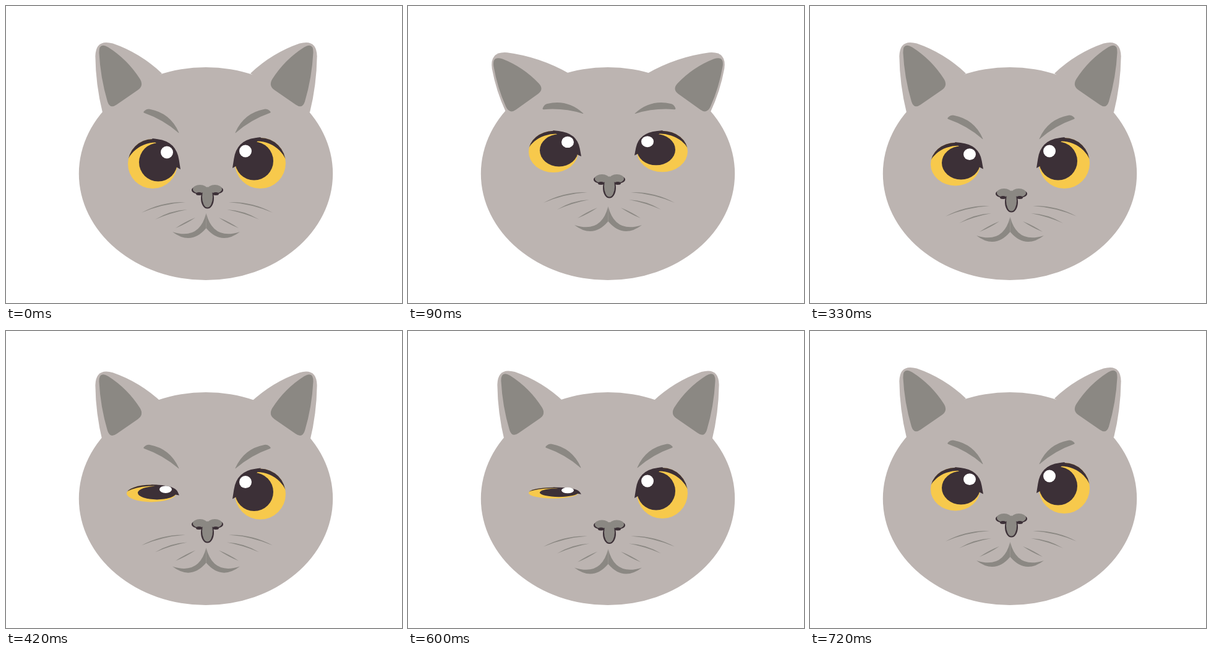
These frames come from a looping animation (640 px wide and 480 px high, 1.11 s). An HTML page with a canvas:

```html
<!DOCTYPE html>
<html lang="en">
<head>
<meta charset="utf-8">
<title>Winking cat</title>
<style>
html, body { margin: 0; width: 100%; height: 100%; overflow: hidden; background: #fff; }
canvas { display: block; width: 640px; height: 480px; }
</style>
</head>
<body>
<canvas id="stage" width="640" height="480"></canvas>
<script>
const ctx = document.getElementById('stage').getContext('2d');
const LOOP = 1110, STEP = 30;
const FUR = '#bcb4b1', GREY = '#8b8883', DARK = '#3c3037', GOLD = '#f7c94c';

// Values of the pose at rest; other poses name only what changes.
// ear: 0 upright, 1 spread; brow: turn in degrees; open: height of an eye.
const rest = {
  ear: 0, earY: 0, brow: 0, browY: 10,
  leftX: -2, leftTop: 220, leftOpen: .87, rightTop: 212, rightOpen: 1,
  noseY: 6, hairY: 6, mouthY: 6
};
const pose = change => ({ ...rest, ...change });
const start = pose({ browY: 0, leftX: 0, leftTop: 214, leftOpen: 1, noseY: 0, hairY: 0, mouthY: 0 });
const lookUp = pose({ ear: 1, brow: -24, browY: -18, leftTop: 201, leftOpen: .84,
                      rightTop: 201, rightOpen: .81, noseY: -17, hairY: -16, mouthY: -11 });
const drop = pose({ ear: .45, earY: -2, brow: -10, browY: -9, leftTop: 200, leftOpen: 1,
                    rightTop: 199, noseY: -11, hairY: -10, mouthY: -8 });
const wink = pose({ earY: 11, browY: 22, leftTop: 267, leftOpen: 0, rightTop: 228,
                    noseY: 21, hairY: 17, mouthY: 22 });
const peek = pose({ leftTop: 238, leftOpen: .45, noseY: 12, hairY: 12, mouthY: 13 });
const KEYS = [[0, start], [90, lookUp], [240, lookUp], [270, drop], [330, rest],
              [480, wink], [570, wink], [630, peek], [720, rest], [LOOP, rest]];

const mix = (a, b, k) => a + (b - a) * k;
const between = (p, q, k) => p.map((v, i) => mix(v, q[i], k));

function poseAt(t) {
  const i = KEYS.findIndex(key => key[0] > t);
  const [t0, a] = KEYS[i - 1], [t1, b] = KEYS[i];
  const p = {};
  for (const name in a) p[name] = mix(a[name], b[name], (t - t0) / (t1 - t0));
  return p;
}

// Fills a polygon with bent sides and rounded corners.
// bends[i] pushes side i to its left; rounds[i] is the rounding at corner i.
function blob(color, corners, bends, rounds = []) {
  const n = corners.length;
  const sides = corners.map((a, i) => {
    const j = (i + 1) % n, b = corners[j];
    const dx = b[0] - a[0], dy = b[1] - a[1], len = Math.hypot(dx, dy);
    const c = [(a[0] + b[0]) / 2 + dy / len * bends[i], (a[1] + b[1]) / 2 - dx / len * bends[i]];
    const u = (rounds[i] || 0) / len, v = 1 - (rounds[j] || 0) / len;
    const point = (s, t) => between(between(a, c, s), between(c, b, s), t);
    return { from: point(u, u), ctrl: point(u, v), to: point(v, v), corner: b };
  });
  ctx.beginPath();
  ctx.moveTo(...sides[0].from);
  sides.forEach((side, i) => {
    ctx.quadraticCurveTo(...side.ctrl, ...side.to);
    ctx.quadraticCurveTo(...side.corner, ...sides[(i + 1) % n].from);
  });
  ctx.fillStyle = color;
  ctx.fill();
}

function oval(color, x, y, rx, ry = rx) {
  ctx.beginPath();
  ctx.ellipse(x, y, rx, ry, 0, 0, Math.PI * 2);
  ctx.fillStyle = color;
  ctx.fill();
}

function shifted(x, y, draw) {
  ctx.save();
  ctx.translate(x, y);
  draw();
  ctx.restore();
}

// Mirrors so that x becomes sum - x.
function mirrored(sum, draw) {
  ctx.save();
  ctx.translate(sum, 0);
  ctx.scale(-1, 1);
  draw();
  ctx.restore();
}

function both(sum, y, draw) {
  shifted(0, y, () => { draw(); mirrored(sum, draw); });
}

function earBack(k) {
  blob(FUR, [
    between([156, 172], [158, 171], k),
    between([145, 53], [132, 73], k),
    between([252, 109], [262, 110], k)
  ], [9, 17, 0], [0, 28, 0]);
}

function earInside(k) {
  blob(GREY, [
    between([150, 58], [136, 80], k),
    between([223, 129], [220, 135], k),
    between([168, 167], [164, 175], k)
  ], [16, 0, 9], [17, 12, 13]);
}

function brow(turn) {
  shifted(250.5, 189, () => {
    ctx.rotate(turn * Math.PI / 180);
    blob(GREY, [[-29.5, -17], [-22.5, -23], [29.5, 17]], [0, 19, -7], [3, 4, 2]);
  });
}

function eye(top, open, r, gaze) {
  ctx.save();
  ctx.translate(0, top);
  ctx.scale(1, open);
  oval(GOLD, 411, r + 1, r);

  // the lid is what a larger circle leaves of the eyeball
  ctx.save();
  ctx.clip();
  ctx.beginPath();
  ctx.rect(360, -10, 100, 100);
  ctx.arc(406, 57.5, 51, 0, Math.PI * 2);
  ctx.fillStyle = DARK;
  ctx.fill('evenodd');
  ctx.restore();

  blob(DARK, [[366, 50], [373, 5], [412, 0], [373, 46]], [0, 0, 0, 0], [0, 30, 0, 0]);
  oval(DARK, 401 + gaze, 38.5, 31);
  oval('#fff', 387 + gaze, 22.5, 10, 10 / Math.sqrt(open));
  ctx.restore();
}

function shutEye() {
  blob(DARK, [[189, 267], [275, 269], [280, 276], [270, 273]], [-1, 0, 0, 3], [0, 4, 0, 4]);
}

function whiskers() {
  const hair = (a, b, bend) => blob(GREY, [a, b], [bend + 2, 2 - bend]);
  hair([219, 334], [290, 317], 8);
  hair([241, 345], [293, 329], 5);
  hair([274, 359], [306, 342], 0);
}

function halfMouth() {
  blob(GREY, [[323.5, 335], [269, 365], [323.5, 359]], [33, -26, 0]);
}

function nose() {
  both(651, 0, () => oval(DARK, 312, 297.5, 12, 6.5));
  both(651, 0, () => oval(GREY, 313.5, 296, 11.5, 7));
  both(651, 0, () => oval(DARK, 312, 303.5, 5, 2.5));
  oval(DARK, 325.5, 311, 10.5, 16.5);
  oval(GREY, 325.5, 309, 8.5, 16.5);
  oval(GREY, 325.5, 298, 12, 5);
}

function draw(p) {
  ctx.fillStyle = '#fff';
  ctx.fillRect(0, 0, 640, 480);

  both(647, p.earY, () => earBack(p.ear));
  oval(FUR, 323, 271, 205.2, 172);
  both(647, p.earY, () => earInside(p.ear));
  both(650, p.browY, () => brow(p.brow));

  eye(p.rightTop, p.rightOpen, 41, 0);
  if (p.leftOpen < .05) shutEye();
  else mirrored(648 + p.leftX, () => eye(p.leftTop, p.leftOpen, 40, 1));

  both(650, p.hairY, whiskers);
  both(647, p.mouthY, halfMouth);
  shifted(0, p.noseY, nose);
}

const begin = performance.now();
function tick() {
  const t = (performance.now() - begin) % LOOP;
  draw(poseAt(Math.floor(t / STEP) * STEP));
  requestAnimationFrame(tick);
}
tick();
</script>
</body>
</html>
```
